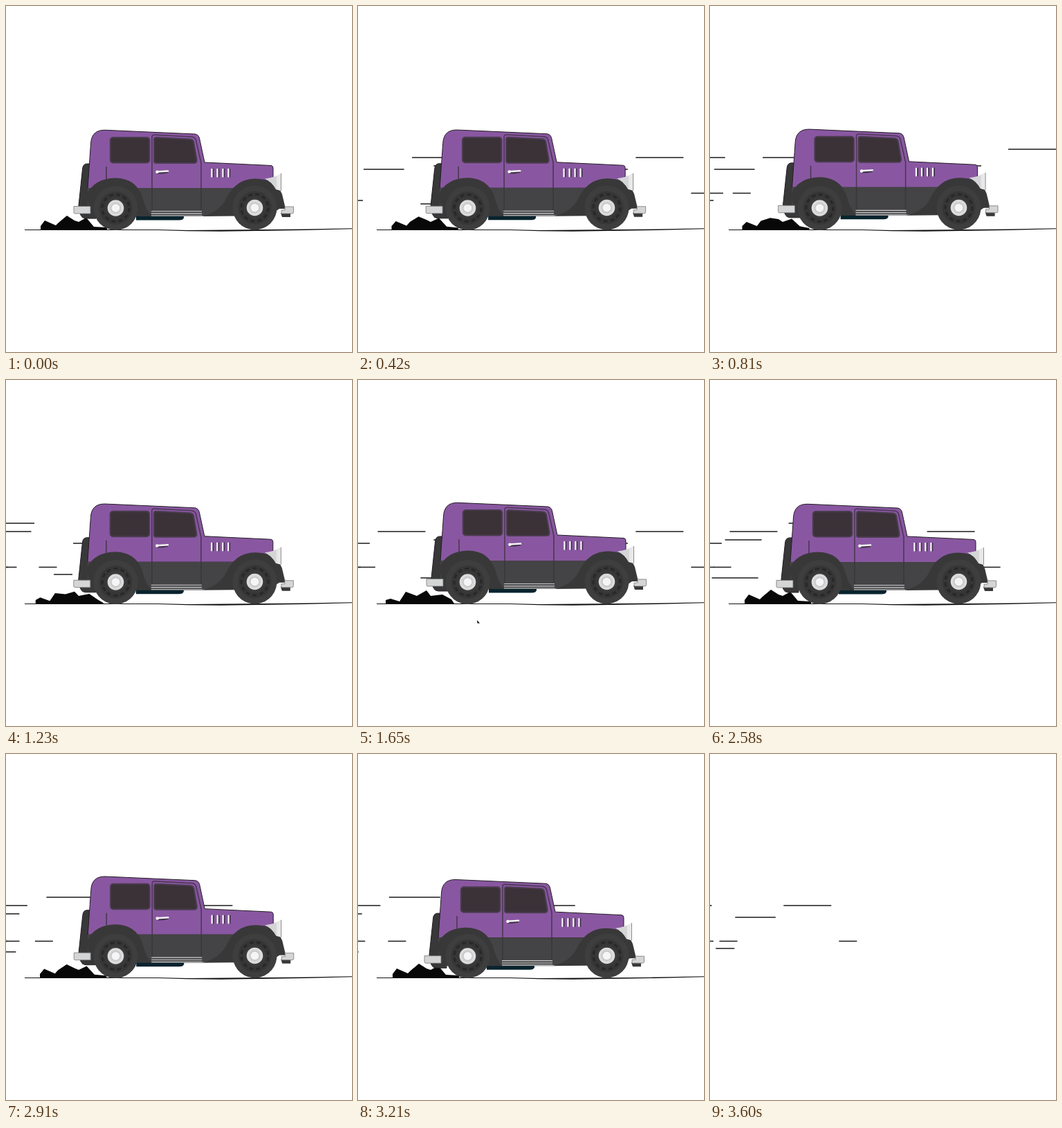
Animation of 500 by 500 pixels, one loop 3.63 s. Source, as an HTML page:

```html
<!DOCTYPE html>
<html lang="en">
<head>
<meta charset="utf-8">
<title>Driving car</title>
<style>
  html, body { margin: 0; width: 100%; height: 100%; overflow: hidden; background: #fff; }
  svg { display: block; width: 100vw; height: 100vh; }
  .edge { stroke: #221c24; stroke-width: 1; }
  .purple { fill: #8957a1; }
  .low { fill: #444345; }
  .fender { fill: #393839; }
  .glass { fill: #3a3237; stroke: #4b3c50; stroke-width: 2; }
  .seam { fill: none; stroke: #4a3854; stroke-width: 1.6; }
  .chrome { fill: #d4d5d6; }
</style>
</head>
<body>
<svg viewBox="0 0 500 500">
  <defs>
    <g id="streaks" fill="none" stroke="#1d1b1c" stroke-width="1.6">
      <path d="M-200 207h74M0 219h69M-292 231h53M-70 236h58.5M80 270.5h26M-98 281h27M-311 286h67"/>
    </g>
    <g id="tyre">
      <circle r="32" fill="#3f3e3f"/>
      <circle r="24" fill="#373637"/>
      <circle r="19.5" fill="none" stroke="#292829" stroke-width="3.2" stroke-dasharray="6 4.21"/>
      <circle r="15" fill="#3b3a3b"/>
    </g>
    <g id="hub">
      <circle r="11.8" fill="#dcdcdd"/>
      <circle r="8.2" fill="#cbcacd"/>
      <circle r="5.8" fill="#f6f5f6"/>
    </g>
  </defs>

  <g id="lines"></g>

  <g id="scene">
    <path d="M27 323L220 323L262 324L432 322.6L500 321.2L500 322.2L460 323.2L432 324L310 325.8L262 325.2L220 324L27 324Z" fill="#111"/>
    <path id="dust" fill="#080808"/>
    <path id="bit" d="M172 347l4 4.500h-3.500z" fill="#080808"/>

    <g id="body">
      <path d="M188 301H257V306Q256 309.500 250 309.500H188Z" fill="#08242e"/>
      <path class="fender edge" d="M119 228Q111 227 110.500 236L105 288Q106 307 115 307H130V228Z"/>
      <path class="low" d="M118 262H340V303H205L118 300Z"/>
      <path class="purple edge" d="M118 263.500L122.500 199Q123.500 179 143 179.300L273 185Q278 185.500 279.500 191L287 226L383 230.500Q386 231 386 234V250L340 263.500Z"/>
      <path class="low" d="M118 263H340V270H118Z"/>
      <rect class="glass" x="150.800" y="190" width="56.500" height="36.500" rx="4"/>
      <path class="glass" d="M217 190L266 192.500Q270 193 271 196L275.500 222Q276 227 272 227H217Q214 227 214 224V193Q214 190 217 190Z"/>
      <path class="seam" d="M211 263V189Q211 186 215 186.200L268 189Q273.500 189.500 274.500 194L282 227V263M145 232V250"/>
      <path class="seam" d="M211 263V303M282 263V296" style="stroke:#3a383a"/>
      <path d="M218 241Q226 241 234 239.500" stroke="#40304a" stroke-width="3.500" fill="none"/>
      <path d="M218 239.500L234 238.500" stroke="#f4f4f4" stroke-width="2.600" stroke-linecap="round"/>
      <circle cx="218.500" cy="239.800" r="2.300" fill="#f4f4f4"/>
      <path d="M299.300 235v12.500m8 -12.500v12.500m8 -12.500v12.500m8 -12.500v12.500" stroke="#42304b" stroke-width="2"/>
      <path d="M297.400 235v12.500m8 -12.500v12.500m8 -12.500v12.500m8 -12.500v12.500" stroke="#fafafa" stroke-width="2.200"/>

      <path class="fender" d="M117 272Q128 249 158 248.500Q188 249 197 276Q202 296 211 304H122Z"/>
      <path class="fender" d="M282 304Q306 299 317 281Q331 249 361 249.500Q390 250 399 272L404 293H395L380 303Z"/>
      <path class="chrome" d="M374 249.500Q388 248 397.500 242V267L390 265Q384 254 374 249.500Z"/>
      <path d="M391 245.500L397.500 242V267L391 265Z" fill="#e8e8e9"/>
      <path class="seam" d="M397.500 242V267" style="stroke:#777;stroke-width:.8"/>

      <path d="M210 296H283V304H210Z" fill="#4b4a4c"/>
      <path d="M210 296.500h73M210 299.800h73M210 303h73" stroke="#c9c9ca" stroke-width="1.200"/>
      <path class="fender" d="M107 299H130V306H110ZM397 299H411V305H399Z"/>
      <g stroke="#777" stroke-width=".8">
        <path class="chrome" d="M98 289.500H122V300H100Q98 300 98 298Z"/>
        <path class="chrome" d="M403 290H415.500V298Q415.500 300 413 300H398V295H403Z"/>
      </g>
    </g>

    <g transform="translate(158.500 292)"><use class="spin" href="#tyre"/><use href="#hub"/></g>
    <g transform="translate(359.500 291.500)"><use class="spin" href="#tyre"/><use href="#hub"/></g>
  </g>
</svg>
<script>
const LOOP = 3630, STEP = 30, CAR_END = 3600;
const $ = id => document.getElementById(id);

// Moments at which each gust of streaks enters
const gusts = [165, 351, 553, 810, 1047, 1338, 1581, 1781, 2010, 2268, 2476, 2780, 3073, 3371];
const FADE = 186, REST = -110, REACH = 741;

// time, body x, body y, dust shape
const poses = [
  [0, 0, 0, 0], [300, .8, -1, .1], [540, -.5, .5, .2], [810, .6, -1.2, .35],
  [1110, -.5, .3, .6], [1380, .3, -1, .9], [1650, 1, -2, 1], [2010, 0, -1.5, 1],
  [2280, -1, .2, .5], [2580, -2, 0, 0], [2880, .3, -2.4, .1], [3210, -2, 2.2, 0], [3630, 0, 0, 0]
];

const dustA = [50,323, 50,318, 56,310, 72,317, 76,313, 88,303, 99,310, 105,312, 116,306, 127,319, 146,320];
const dustB = [40,323, 40,318, 47,316, 60,320, 69,306, 85,312, 99,304, 105,312, 122,310, 135,317, 139,323];

const svgNS = 'http://www.w3.org/2000/svg';
const streaks = gusts.map(() => {
  const use = document.createElementNS(svgNS, 'use');
  use.setAttribute('href', '#streaks');
  return $('lines').appendChild(use);
});
const wheels = document.querySelectorAll('.spin');

function poseAt(t) {
  const i = poses.findIndex(p => p[0] > t);
  const a = poses[i - 1], b = poses[i];
  const k = (t - a[0]) / (b[0] - a[0]);
  const e = k * k * (3 - 2 * k);
  return a.slice(1).map((v, n) => v + (b[n + 1] - v) * e);
}

function draw(t) {
  streaks.forEach((s, i) => {
    const x = REST + REACH * Math.exp((gusts[i] - t) / FADE);
    s.style.display = x < 720 && x > -107 ? '' : 'none';
    s.setAttribute('transform', `translate(${Math.min(x, 999).toFixed(2)} 0)`);
  });

  const [dx, dy, w] = poseAt(t);
  $('scene').style.display = t < CAR_END ? '' : 'none';
  $('body').setAttribute('transform', `translate(${dx} ${dy})`);
  $('dust').setAttribute('d', 'M' + dustA.map((v, i) => v + (dustB[i] - v) * w).join(' ') + 'V323.500Z');
  $('bit').style.display = w > .95 ? '' : 'none';
  wheels.forEach(s => s.setAttribute('transform', `rotate(${t / LOOP * 3600})`));
}

const start = performance.now();
function tick() {
  const t = (performance.now() - start) % LOOP;
  draw(Math.floor(t / STEP) * STEP);
  requestAnimationFrame(tick);
}
tick();
</script>
</body>
</html>
```
